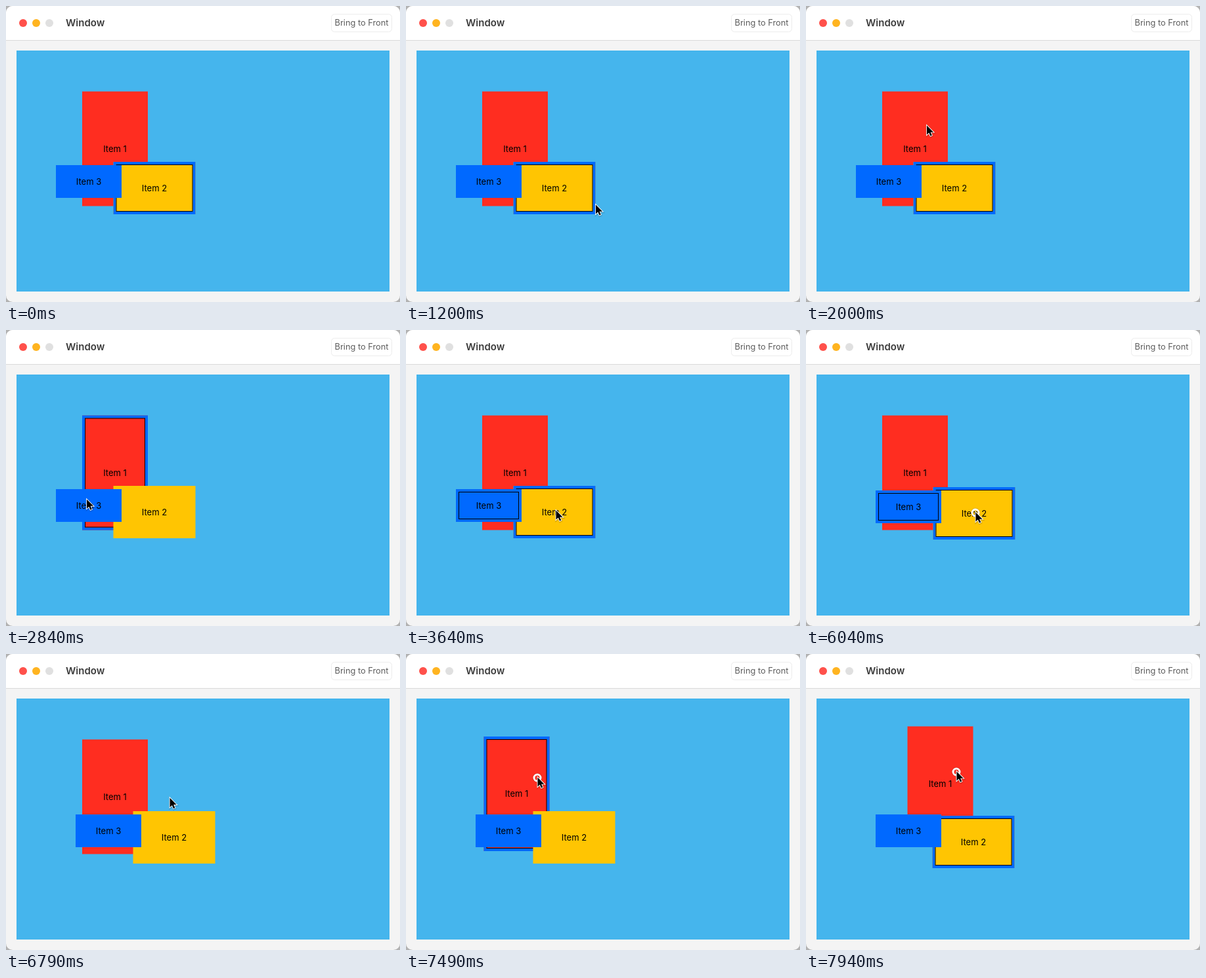
Write an HTML page that moves like this. It is 600 px wide and 452 px high and loops after 7.99 s.

```html
<!DOCTYPE html>
<html lang="en">
<head>
<meta charset="utf-8">
<title>Window</title>
<style>
html, body { margin: 0; height: 100%; overflow: hidden; background: #b2b2b2; }
svg { display: block; }
text { font: 13px Inter, "Liberation Sans", sans-serif; }
.title { font-size: 15px; font-weight: 600; fill: #3c3c3c; }
.label { text-anchor: middle; }
.button { font-size: 12.8px; fill: #5c5c5c; text-anchor: middle; }
.outline { fill: none; stroke: #000; }
</style>
</head>
<body>
<svg width="600" height="452" viewBox="0 0 600 452">
  <clipPath id="frame"><rect width="600" height="452" rx="10"/></clipPath>
  <g clip-path="url(#frame)">
    <rect width="600" height="452" fill="#f4f4f4"/>
    <rect width="600" height="52" fill="#fff"/>
    <rect y="52" width="600" height="1" fill="#dadada"/>
  </g>
  <circle cx="26" cy="26" r="6" fill="#ff514b"/>
  <circle cx="46" cy="26" r="6" fill="#ffb420"/>
  <circle cx="66" cy="26" r="6" fill="#e0e0e0"/>
  <text class="title" x="91" y="31">Window</text>
  <rect x="495.5" y="12.5" width="92" height="27" rx="5" fill="#fff" stroke="#ececec"/>
  <text class="button" x="541.5" y="30.3">Bring to Front</text>
  <rect x="16" y="68" width="568" height="368" fill="#45b5ed"/>
  <g id="items"></g>
  <g id="cursor">
    <g id="ring" fill="none">
      <circle r="5" stroke="#000" stroke-opacity=".15" stroke-width="4.4"/>
      <circle r="5" stroke="#fff" stroke-width="3"/>
    </g>
    <path d="M.5-.5V13.6L3.8 10.6 6 15.6 8.3 14.6 6.1 9.7H10.6Z" transform="translate(.3 1)"
      fill="none" stroke="#000" stroke-opacity=".15" stroke-width="3"/>
    <path d="M.5-.5V13.6L3.8 10.6 6 15.6 8.3 14.6 6.1 9.7H10.6Z"
      stroke="#fff" stroke-width="1.8" paint-order="stroke"/>
  </g>
</svg>
<script>
const LOOP = 7990, ACCENT = "#0069ff";
const smooth = p => p * p * (3 - 2 * p);
const speedUp = p => p ** 1.4;
const slowDown = p => 1 - (1 - p) ** 2;
const linear = p => p;
const nudge = p => Math.ceil(p * 7) / 7;

// Tracks hold [time, x, y, easing into this key]
const pointer = [
  [600, 552, 379], [1050, 288.5, 304, smooth],
  [1200, 288.5, 304], [1400, 263, 301.5, smooth],
  [1550, 263, 301.5], [2000, 183.5, 183, speedUp], [2100, 169, 185, slowDown],
  [2250, 169, 185], [2990, 117, 268, smooth],
  [3090, 117, 268], [3640, 228, 276, smooth],
  [5490, 228, 276], [5890, 258, 279, smooth],
  [6040, 258, 279], [6300, 272, 252, smooth], [6590, 251, 221, smooth],
  [6740, 251, 221], [7190, 195, 200, smooth],
  [7340, 195, 200], [7490, 200, 189, speedUp], [7940, 229, 180, linear]
];
const pressed = [[1350, 1600], [2050, 2350], [2940, 3140], [3440, 3600],
  [5490, 6090], [6540, 6790], [7340, LOOP]];

const pairMove = [[4540, 0, 0], [5090, 3.5, 0, nudge], [5490, 3.5, 0], [5890, 30, 2, smooth]];
const items = [
  { x: 116, y: 130.5, w: 100, h: 175, fill: "#ff2d20",
    move: [[7340, 0, 0], [7490, 2.5, -4.5, speedUp], [7760, 38.5, -20, smooth]],
    selected: [[2250, 3090], [7340, 7790]] },
  { x: 163.5, y: 238, w: 125, h: 80, fill: "#ffc502",
    move: [...pairMove, [7790, 30, 2], [7940, 29, 9, linear]],
    selected: [[0, 2250], [3490, 6740], [7790, LOOP]] },
  { x: 76, y: 243, w: 100, h: 50, fill: ACCENT,
    move: pairMove,
    selected: [[3090, 6740]] }
];

const $ = id => document.getElementById(id);
const during = (spans, t) => spans.some(([a, b]) => t >= a && t < b);
const show = (el, on) => el.setAttribute("visibility", on ? "inherit" : "hidden");

function at(track, t) {
  const i = track.findIndex(k => k[0] > t);
  if (i < 0) return track.at(-1).slice(1, 3);
  if (i === 0) return track[0].slice(1, 3);
  const [t0, x0, y0] = track[i - 1], [t1, x1, y1, ease = linear] = track[i];
  const p = ease((t - t0) / (t1 - t0));
  return [x0 + (x1 - x0) * p, y0 + (y1 - y0) * p];
}

function place(el, x, y) {
  el.setAttribute("transform", `translate(${x} ${y})`);
}

$("items").innerHTML = items.map(({ w, h, fill }, i) => `<g>
  <rect width="${w}" height="${h}" fill="${fill}"/>
  <g><rect x="2" y="2" width="${w - 4}" height="${h - 4}" fill="none" stroke="${ACCENT}" stroke-width="4"/>
  <rect class="outline" x="4.5" y="4.5" width="${w - 9}" height="${h - 9}"/></g>
  <text class="label" x="${w / 2}" y="${h / 2 + 4.7}">Item ${i + 1}</text></g>`).join("");
items.forEach((item, i) => {
  item.el = $("items").children[i];
  item.border = item.el.children[1];
});

function draw(now) {
  const t = now % LOOP;
  for (const { x, y, move, selected, el, border } of items) {
    const [dx, dy] = at(move, t);
    place(el, x + dx, y + dy);
    show(border, during(selected, t));
  }
  place($("cursor"), ...at(pointer, t));
  show($("cursor"), t >= 600);
  show($("ring"), during(pressed, t));
}

let start;
function tick(now) {
  start ??= now;
  draw(now - start);
  requestAnimationFrame(tick);
}
draw(0);
requestAnimationFrame(tick);
</script>
</body>
</html>
```
